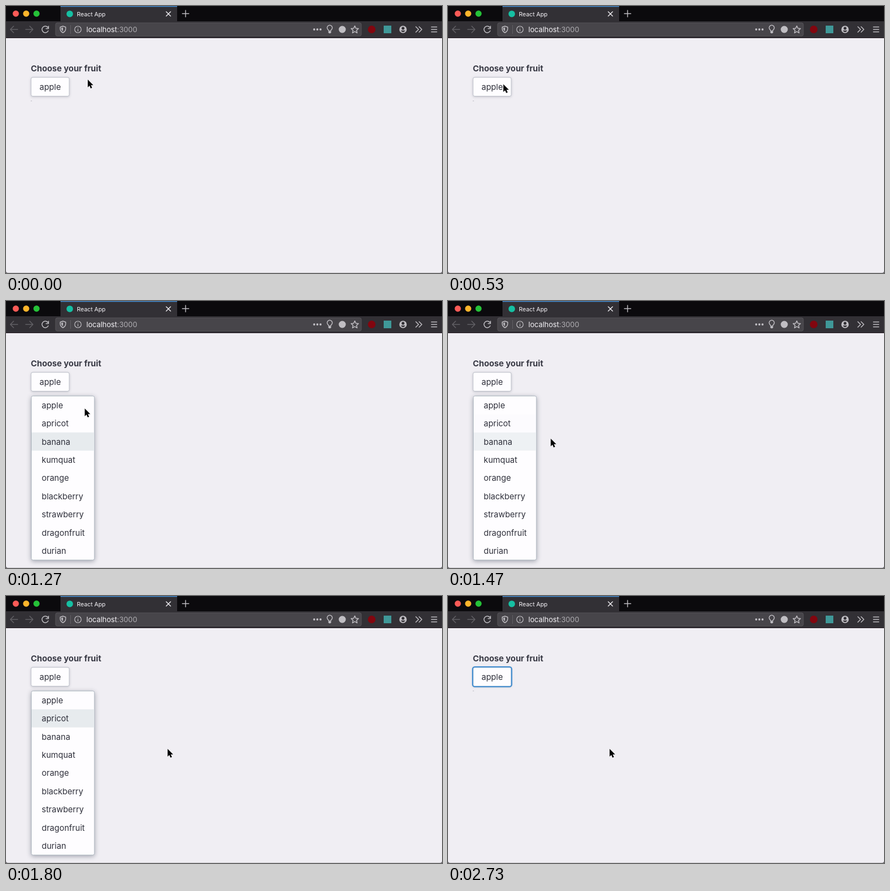
Write an HTML page that moves like this. It is 800 by 490 pixels and loops after 2870 ms.

```html
<!DOCTYPE html>
<html lang="en">
<head>
<meta charset="utf-8">
<title>Fruit select</title>
<style>
  html, body { margin: 0; width: 100%; height: 100%; overflow: hidden; background: #f0eef3; }
  svg { display: block; width: 800px; height: 490px; font: 15px Inter, sans-serif; fill: #2f303b; }
  .icon { fill: none; stroke: #c0bec3; stroke-width: 1.5; stroke-linecap: round; stroke-linejoin: round; }
  .solid { fill: #c0bec3; }
  .off { stroke: #626065; }
  .box { fill: #fefdff; stroke: #bcbfc9; }
  #button { filter: drop-shadow(0 1px 2px #3a425540); }
  #panel { stroke: #abb4bd; filter: drop-shadow(0 2px 4px #3a425570); }
  .highlight { fill: #e7ebee; }
</style>
</head>
<body>
<svg viewBox="0 0 800 490">
  <rect width="800" height="490" fill="#f0eef3"/>

  <!-- Browser chrome -->
  <rect width="800" height="28" fill="#0b0a0d"/>
  <rect y="28" width="800" height="31" fill="#323035"/>
  <rect x="100" width="214" height="28" fill="#323035"/>
  <rect x="100" width="214" height="1.5" fill="#4289cf"/>
  <rect y="58" width="800" height="1" fill="#211820"/>
  <circle cx="18" cy="14" r="5.7" fill="#fc5b57"/>
  <circle cx="37" cy="14" r="5.7" fill="#fdb52b"/>
  <circle cx="56" cy="14" r="5.7" fill="#25c238"/>
  <circle cx="117" cy="14.5" r="6" fill="#16bfa2"/>
  <text x="130" y="18.5" font-size="10.8" fill="#f6f4f8">React App</text>
  <path class="icon" style="stroke:#f0eef2" d="M294 10.5l8 8m0-8l-8 8"/>
  <path class="icon" d="M323.500 14h12m-6-6v12"/>

  <path class="icon off" d="M21.500 43H8m6-6l-6 6 6 6M36 43h13.500m-6-6l6 6-6 6"/>
  <path class="icon" stroke-width="1.800" d="M77 39.500a6 6 0 1 0 .5 6M78 37v4.500h-4.500"/>
  <rect x="91" y="31" width="561" height="24" rx="3" fill="#47454a" stroke="#565459"/>
  <path class="icon" d="M104.500 37l5 1.700v3.300q0 4.500-5 7-5-2.500-5-7v-3.300z"/>
  <path class="solid" d="M104.500 39.200v7.300q-3-1.800-3-4.500v-1.800z"/>
  <path stroke="#626065" d="M118.500 35v16"/>
  <g class="icon" style="stroke-width:1.200">
    <circle cx="132" cy="43" r="6"/>
    <path d="M132 42.500v3.500m0-6.200v.1"/>
  </g>
  <text x="147.500" y="48" font-size="13.200" fill="#f6f4f8">localhost<tspan fill="#b0aeb3">:3000</tspan></text>
  <g class="solid">
    <circle cx="565.500" cy="43" r="1.900"/><circle cx="571.300" cy="43" r="1.900"/><circle cx="577.100" cy="43" r="1.900"/>
    <circle cx="617" cy="43" r="6.500"/>
    <path d="M591.500 46.500h5v2.500q-2.500 2.500-5 0z"/>
  </g>
  <path class="icon" d="M592.300 46q0-1.500-1.500-2.600a4.700 4.700 0 1 1 6.400 0q-1.500 1.100-1.500 2.600z"/>
  <path class="icon" d="M640 36.500l2 4.400 4.800.5-3.600 3.200 1 4.800-4.200-2.500-4.200 2.500 1-4.800-3.600-3.200 4.800-.5z"/>
  <circle cx="671" cy="43" r="7" fill="#82060f"/>
  <rect x="693" y="36" width="14" height="14" fill="#3f9898"/>
  <circle class="solid" cx="728.500" cy="43" r="6.800"/>
  <path fill="#323035" d="M728.500 38.300a2.600 2.600 0 0 1 0 5.200 2.600 2.600 0 0 1 0-5.200M724.500 45h8q-1.500 3-4 3t-4-3z"/>
  <path class="icon" d="M752 38l5 5-5 5m6-10l5 5-5 5M780.500 38.500h10m-10 4.500h10m-10 4.500h10"/>

  <!-- Page -->
  <text x="45.500" y="119.700" font-size="15.200" font-weight="700" fill="#393a45">Choose your fruit</text>
  <rect id="dot" x="45.500" y="173.500" width="2" height="1.500" fill="#c3c2c9"/>
  <rect id="button" class="box" x="46" y="131" width="70" height="34.500" rx="3"/>
  <rect id="ring" x="45.200" y="130.200" width="71.600" height="36.200" rx="4" fill="none" stroke="#458fd0" stroke-width="2.300"/>
  <text x="61.500" y="154">apple</text>
  <g id="menu">
    <rect id="panel" class="box" x="46.500" y="174.300" width="115.700" height="301" rx="3"/>
    <rect id="apricot" class="highlight" x="47" y="208" width="114.700" height="33.300"/>
    <rect id="banana" class="highlight" x="47" y="241.300" width="114.700" height="33.300"/>
    <g id="items"></g>
  </g>
  <path d="M0 489.500H800" stroke="#c9c7cc"/>
  <path d="M0 486v4h4q-4 0-4-4M800 486v4h-4q4 0 4-4" fill="#55535a"/>
  <path id="cursor" d="M0 0v14.200l3.200-3 2.200 5 2.600-1.100-2.200-4.900h4.400z" fill="#050506" stroke="#fff" stroke-width="1" paint-order="stroke"/>
</svg>
<script>
const LOOP = 2870, TICK = 1000 / 15;
const $ = id => document.getElementById(id);
const fruits = ['apple', 'apricot', 'banana', 'kumquat', 'orange', 'blackberry', 'strawberry', 'dragonfruit', 'durian'];
$('items').innerHTML = fruits.map((name, i) =>
  `<text x="65.500" y="${197 + i * 33.370}">${name}</text>`).join('');

const clamp = v => Math.min(1, Math.max(0, v));
const smooth = u => u * u * (3 - 2 * u);
const easeIn = u => u ** 1.5;
const easeOut = u => 1 - (1 - u) ** 1.5;

// Pointer moves, in ticks: start, end, dx, dy, easing
const moves = [
  [0, 8, -48.5, 8.500, smooth],
  [14, 22, 87, 109, easeIn],
  [22, 27, 108, 28, easeOut]
];

function pointer(tick) {
  let x = 150, y = 135;
  for (const [start, end, dx, dy, ease] of moves) {
    const k = ease(clamp((tick - start) / (end - start)));
    x += dx * k;
    y += dy * k;
  }
  return `translate(${x} ${y})`;
}

const show = (id, on) => $(id).style.display = on ? '' : 'none';

function draw(now) {
  const tick = Math.floor((now % LOOP) / TICK + 0.06);
  const open = tick >= 14 && tick < 32;
  show('menu', open);
  show('dot', !open);
  show('ring', tick >= 32);
  $('banana').style.opacity = 1 - smooth(clamp((tick - 20.800) / 3));
  $('apricot').style.opacity = smooth(clamp((tick - 21.500) / 2.500));
  $('cursor').setAttribute('transform', pointer(tick));
  requestAnimationFrame(draw);
}
requestAnimationFrame(draw);
</script>
</body>
</html>
```
